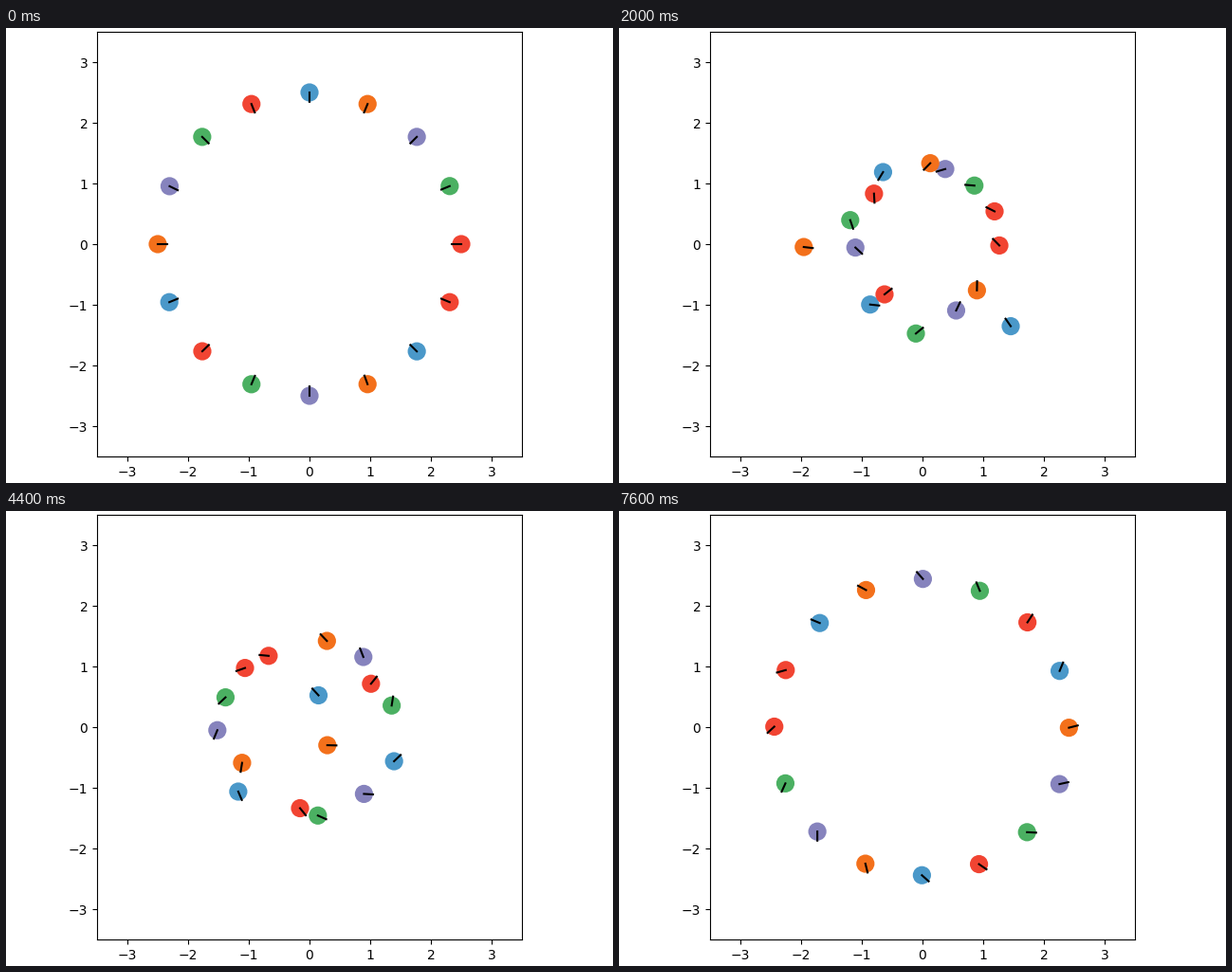
Recreate the animation shown at these times as a matplotlib script. Size 640x480 px, loop 8000 ms.

```python
import numpy as np
import matplotlib.pyplot as plt
from matplotlib.animation import FuncAnimation
from matplotlib.patches import Circle

N = 16
RING = 2.5
RADIUS = 0.15
STEP = 100         # ms per frame
FRAMES = 80
LAST_MOVE = 7.6    # seconds

WAY = 4.95         # robots stop just short of the far side
SPEED = 0.9375     # units per second
RAMP = 1.0         # seconds to reach full speed
BRAKE = 1.8        # decay rate of the final approach
SKEW = 1.35        # moves the widest point of the arc past the middle

# How far each robot swings out to the side, and how late it runs.
swing = np.array([1.08, 1.10, 1.17, 0.86, 1.30, 0.76, 1.06, 0.81,
                  0.30, 1.17, 0.25, 1.16, 1.02, 0.95, 0.48, 0.92])
lag = np.array([0.1, 0.07, 0.05, 0.2, 0.1, -0.02, 0.03, -0.1,
                0.92, 0.09, -0.07, 0.33, 0, -0.05, 0.95, 0.09])
turn = np.exp(2j * np.pi * np.arange(N) / N)


def travel(t):
    """Distance covered: speed up, cruise, then brake exponentially."""
    t = np.maximum(t, 0)
    cruise = SPEED * np.where(t < RAMP, t * t / (2 * RAMP), t - RAMP / 2)
    zone = SPEED / BRAKE
    over = np.maximum(cruise - (WAY - zone), 0)
    return np.where(over > 0, WAY - zone * np.exp(-over / zone), cruise)


def robots(t):
    """Centers and unit headings on arcs across the ring."""
    u = travel(t - lag) / WAY
    phase = np.pi * u ** SKEW
    side = swing * np.sin(phase)
    slope = swing * np.pi * SKEW * u ** (SKEW - 1) * np.cos(phase)
    ahead = -WAY + 1j * slope
    return turn * (RING - WAY * u + 1j * side), turn * ahead / abs(ahead)


fig = plt.figure(figsize=(6.4, 4.8), dpi=100)
ax = fig.add_axes([96 / 640, 28 / 480, 448 / 640, 448 / 480])
ax.set(xlim=(-3.5, 3.5), ylim=(-3.5, 3.5))

maps = ["Reds", "Greens", "Purples", "Oranges", "Blues"]
bodies, noses = [], []
for i in range(N):
    color = plt.get_cmap(maps[i % len(maps)])(0.6)
    bodies.append(ax.add_patch(Circle((0, 0), RADIUS, fc=color, ec="none")))
    noses += ax.plot([], [], "k-", lw=1.5)


def draw(frame):
    centers, headings = robots(min(frame * STEP / 1000, LAST_MOVE))
    tips = centers + RADIUS * headings
    for body, nose, c, tip in zip(bodies, noses, centers, tips):
        body.center = c.real, c.imag
        nose.set_data([c.real, tip.real], [c.imag, tip.imag])
    return bodies + noses


anim = FuncAnimation(fig, draw, frames=FRAMES, interval=STEP, repeat=True)
plt.show()
```
